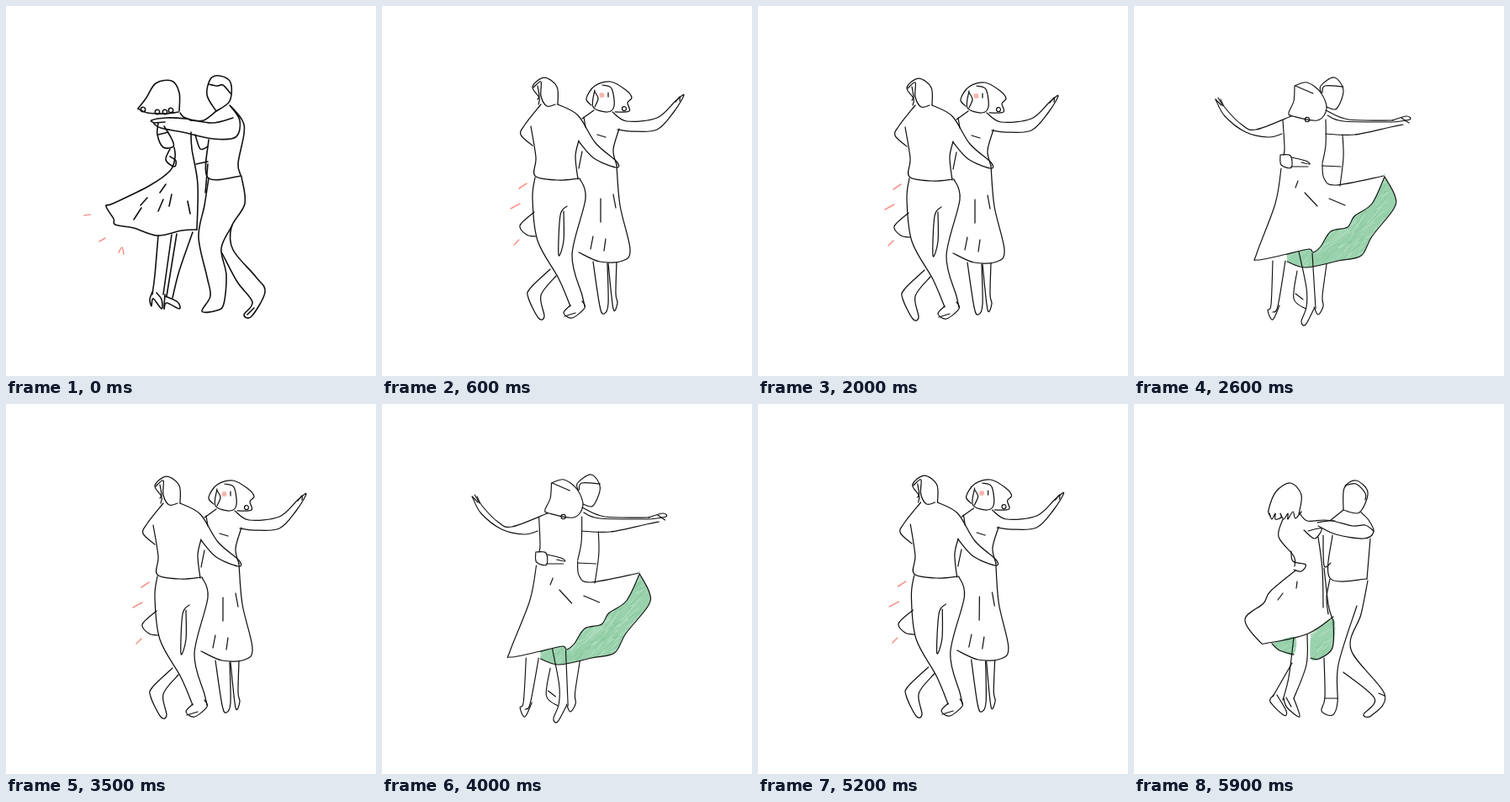
Animation, 440 px wide and 440 px high, one loop 6000 ms. Source, as an HTML page with a canvas:

```html
<!DOCTYPE html>
<html lang="en">
<head>
<meta charset="utf-8">
<title>Dancing couple</title>
<style>
html, body { margin: 0; width: 100%; height: 100%; overflow: hidden; background: #fff; }
canvas { display: block; width: 100vmin; height: 100vmin; }
</style>
</head>
<body>
<canvas id="stage" width="440" height="440"></canvas>
<script>
const ctx = document.getElementById('stage').getContext('2d');

// Smooth curve through the knots "x,y x,y ...".
function curve(knots) {
  const pts = knots.split(' ').map(p => p.split(',').map(Number));
  const path = new Path2D(), last = pts.length - 1;
  path.moveTo(...pts[0]);
  for (let i = 0; i < last; i++) {
    const a = pts[Math.max(0, i - 1)], b = pts[i], c = pts[i + 1], d = pts[Math.min(last, i + 2)];
    const ease = k => [b[k] + (c[k] - a[k]) / 6, c[k] - (d[k] - b[k]) / 6];
    const [x1, x2] = ease(0), [y1, y2] = ease(1);
    path.bezierCurveTo(x1, y1, x2, y2, ...c);
  }
  return path;
}

const pen = (...strokes) => strokes.forEach(s => ctx.stroke(curve(s)));

function ink(color, width) {
  ctx.strokeStyle = color;
  ctx.lineWidth = width;
}

function curl(x, y, r = 2.7) {
  ctx.beginPath();
  ctx.arc(x, y, r, 0, 6);
  ctx.stroke();
}

function pink(...strokes) {
  ink('#f5978c', 1.6);
  pen(...strokes);
}

function crayon(outline) {
  let seed = 7;
  const random = () => (seed = seed * 16807 % 2147483647) / 2147483647;
  ctx.save();
  ctx.clip(curve(outline));
  ctx.fillStyle = '#9ad2ad';
  ctx.fillRect(0, 0, 440, 440);
  for (let i = 0; i < 500; i++) {
    const x = 155 + random() * 160, y = 195 + random() * 120, len = 5 + random() * 7;
    ink(random() < 0.5 ? '#b5dfc3' : '#88c89e', 1);
    ctx.beginPath();
    ctx.moveTo(x, y);
    ctx.lineTo(x + len, y - len * (0.4 + random()));
    ctx.stroke();
  }
  ctx.restore();
}

function sidePose() {
  ink('#111', 1.6);
  // woman
  pen('157,122 167,109 178,92 197,89 206,103 206,125', '157,122 168,127 190,128 205,126');
  curl(163, 123);
  curl(180, 126);
  curl(189, 126);
  curl(196, 124);
  pen('181,139 180,153 187,168 199,167 197,158 188,143', '181,153 193,150',
    '195,170 190,183 200,191 202,184 195,179');
  pen('200,168 201,180 195,196 170,214 127,235 119,238 128,253 130,260 152,264 180,273 209,267 227,266',
    '220,150 221,170 228,212 227,266', '207,127 211,132 219,135');
  pen('190,212 183,222', '187,230 181,244', '161,240 152,254', '168,228 160,237', '197,224 194,238', '216,232 219,247');
  pen('181,273 177,320 174,343', '197,272 187,343', '222,269 206,315 198,347', '203,271 191,345');
  pen('174,340 171,349 173,357 175,348 185,360 185,349 179,341',
    '189,343 188,360 191,353 206,360 204,352 189,345');
  // man
  pen('250,125 239,106 243,87 254,83 267,91 266,113 250,125', '241,93 251,95 258,94 267,104');
  pen('176,139 173,136 190,133 213,134 245,139 270,133', '176,139 189,138',
    '176,140 184,145 210,150 247,158 273,156 278,136 266,118 281,136 283,152 276,187 279,201');
  pen('250,125 235,136 219,136', '241,159 240,204 280,202', '225,153 231,170 240,167', '226,188 240,185', '240,188 237,222');
  pen('241,205 236,237 229,275 239,322 243,345 233,363 251,362 259,354 262,320 256,288 269,261',
    '280,203 284,235 268,263 270,290 297,322 308,340 292,369 283,367 293,352 275,328 257,294', '287,367 295,359');
  pink('93,249 100,248', '111,280 118,276', '134,293 138,287 140,295');
}

function frontPose() {
  ink('#111', 1.25);
  // woman
  pen('247,119 241,111 251,96 270,91 288,101 295,110 290,116 292,126 275,127',
    '251,101 249,121 266,127 274,120 271,99 260,95', '251,121 255,111 251,103', '267,104 267,109');
  curl(286, 123, 2.5);
  pen('250,125 236,135', '238,133 240,145', '272,127 289,138 325,134 347,114 357,107 345,127 325,148 295,150 278,148',
    '347,115 352,109 352,114', '280,147 273,172 277,190', '254,154 264,157');
  pen('236,174 232,194', '277,190 281,238 293,290 284,304 257,305 232,294', '179,246 162,262 170,273 181,275');
  pen('258,230 258,258', '273,225 276,241', '249,275 246,290', '264,278 262,292');
  pen('249,305 257,358 262,367 267,355 266,307', '277,306 276,343 278,354 273,361 267,307');
  // man
  pen('184,118 185,110 177,97 191,86 206,97 207,118', '178,98 187,91 187,108 194,120 204,118', '183,96 185,108 183,112');
  pen('187,118 168,142 163,154 177,167', '175,144 181,181 180,203 207,208 232,206',
    '207,118 231,131 252,164 277,186 276,193 250,182 232,162', '232,161 228,180 231,207');
  pen('180,205 177,230 183,280 208,325 222,358', '233,206 240,230 224,297 236,345 239,358',
    '218,239 210,250 208,297 214,280 214,245');
  pen('222,357 214,366 224,372 239,360 236,352', '215,370 228,366',
    '198,314 174,337 172,348 184,372 191,370 187,345 205,322');
  pink('161,218 170,212', '151,242 162,236', '155,285 161,279');
  ctx.fillStyle = '#f9b5ad';
  ctx.beginPath();
  ctx.arc(259.5, 107, 3, 0, 7);
  ctx.fill();
}

function backPose() {
  const hem = '182,295 208,289 213,293 222,286 234,268 254,263 262,250 283,235 298,203';
  const underside = '298,203 310,225 309,241 283,274 270,297 243,303 205,311 182,304';
  crayon(hem + ' ' + underside);
  ink('#111', 1.15);
  // woman
  pen('191,95 206,91 222,103 229,122 218,136 189,131 184,127 190,113 191,95', '192,95 213,104');
  curl(206, 135);
  pen('97,111 108,131 133,150 160,156 176,152', '97,111 104,118', '100,109 106,119',
    '103,111 109,122 128,141 145,147 187,131');
  pen('228,124 255,135 309,136', '230,130 249,137 308,138', '228,152 262,153 305,144 320,141',
    '307,136 324,131 328,135 309,138', '318,133 327,139');
  pen('177,136 179,168 178,177', '228,135 228,165 224,187');
  pen('175,193 168,235 146,294 147,302 182,295', hem, underside, '224,188 226,205 240,213 297,202');
  pen('203,222 218,238', '232,229 251,237', '195,208 192,216');
  pen('174,177 175,189 187,192 186,178 174,177', '187,180 204,184 209,188 199,186', '187,191 207,191');
  pen('165,303 163,355 159,362 165,373 173,356', '180,303 171,357 165,364',
    '196,292 205,335 205,358 199,375 204,379 214,360', '212,294 216,360');
  // man
  pen('223,104 222,95 238,85 249,100 241,122 229,120', '224,103 227,95 249,96');
  pen('248,153 249,180 245,214', '224,190 246,191');
  pen('229,307 224,345 225,357 219,367 214,358', '194,315 190,348 204,360', '192,342 201,349');
}

function turnPose() {
  crayon('164,285 191,277 190,298 173,293 164,285');
  crayon('210,274 237,256 236,290 220,303 210,302 210,274');
  ink('#111', 1.2);
  // woman
  pen('162,133 160,126 169,104 186,94 199,108 196,131',
    '161,130 164,137 168,130 168,137 175,135 174,130 178,137 183,130 183,137 189,128 192,136 199,128');
  pen('177,137 172,158 190,181 191,193', '197,130 206,139 225,138 239,139',
    '202,150 215,160 223,148 207,151', '187,175 189,187 204,191 199,199 190,197', '219,158 224,197 225,242');
  pen('192,198 162,223 154,237 132,256 149,282 160,284 207,273 237,253', '226,195 231,238 236,256',
    '164,285 173,293 190,298', '237,256 236,290 220,303 210,302');
  pen('194,211 193,219', '177,225 171,233');
  pen('190,278 184,325 177,352', '206,274 205,310 190,350', '188,308 165,348');
  pen('166,346 162,354 178,370 181,365 170,346', '178,350 182,361 197,372 190,350', '181,349 187,360');
  // man
  pen('249,126 250,100 264,91 278,105 268,129 249,126', '251,97 264,95 275,106 275,114');
  pen('249,126 234,138', '218,141 235,139 260,145 275,144 285,151', '219,145 240,155 273,160 285,152 279,138 270,129');
  pen('281,160 277,208', '236,156 233,207 277,208', '225,156 226,192 234,189');
  pen('233,208 229,230 231,250', '226,302 227,349 223,365 236,370 242,355 243,310 265,240', '227,350 242,350');
  pen('278,210 270,250 258,292 298,345 283,370 273,369 286,350 249,319', '291,344 298,347');
}

// Each step: pose, sideways shift, drop and lean of the couple.
const steps = [
  [sidePose, 0, 0, 0], [sidePose, -6, 1, 0.02], [sidePose, -2, 2, -0.03],
  [frontPose, -8, 3, 0.03], [frontPose, -4, 6, 0.02], [frontPose, 0, 0, 0],
  [frontPose, 2, -1, 0], [frontPose, 4, -1, -0.01], [frontPose, 8, -3, 0],
  [backPose, 10, -2, -0.04], [backPose, 5, -1, -0.02], [backPose, 0, 0, 0],
  [backPose, -10, 1, 0], [turnPose, -4, 0, -0.02], [turnPose, 0, 0, 0]
];

function draw([pose, x, y, lean]) {
  const feet = 370;
  ctx.fillStyle = '#fff';
  ctx.fillRect(0, 0, 440, 440);
  ctx.save();
  ctx.transform(1, 0, lean, 1, x - lean * feet, y);
  pose();
  ctx.restore();
}

ctx.lineCap = ctx.lineJoin = 'round';
let start;
function tick(now) {
  start ??= now;
  draw(steps[Math.floor((now - start) / 100) % steps.length]);
  requestAnimationFrame(tick);
}
requestAnimationFrame(tick);
</script>
</body>
</html>
```
